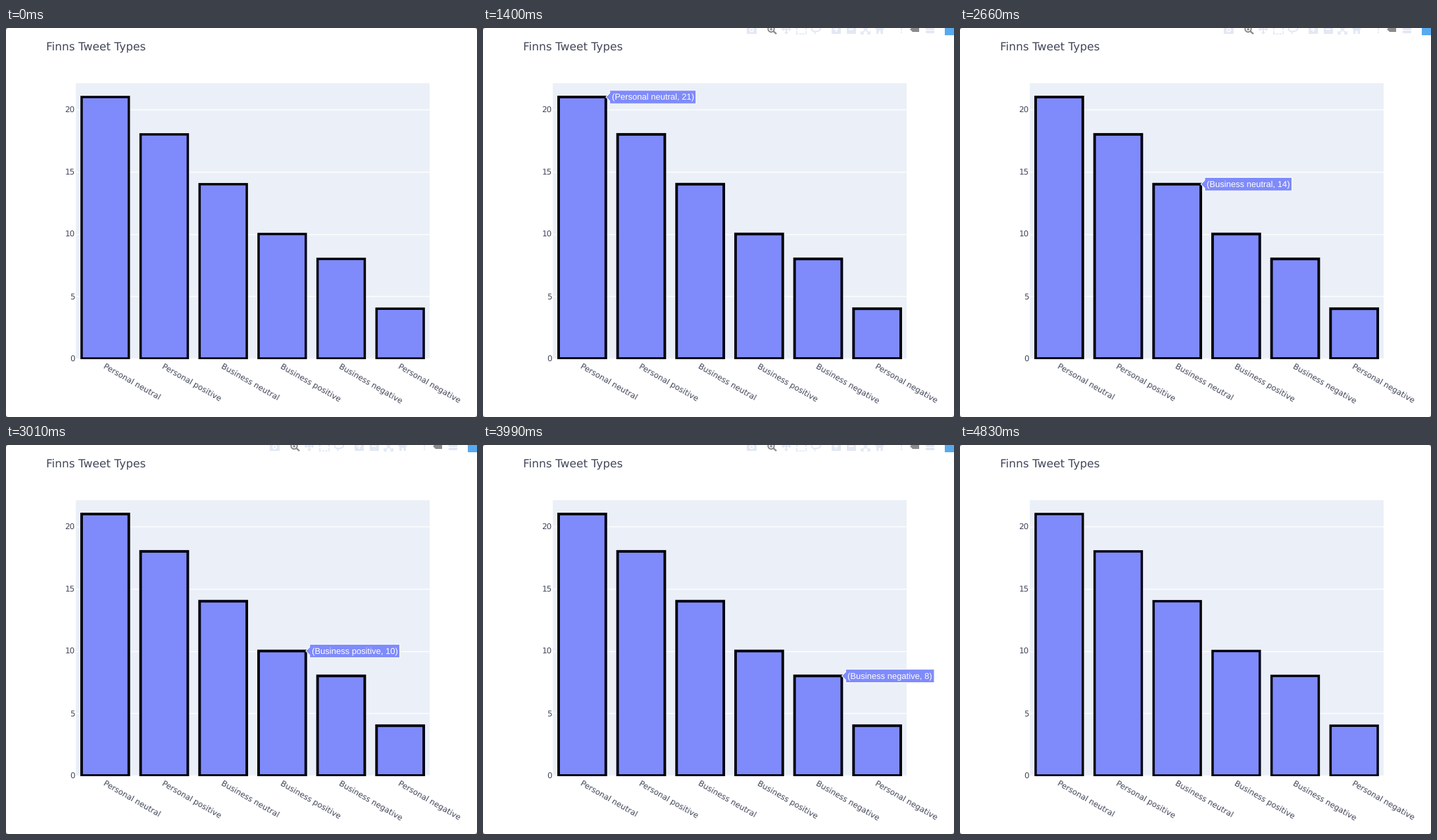
Recreate the animation shown at these times as a matplotlib script. Size 716 by 592 pixels, loop 4.9 s.

```python
import matplotlib.pyplot as plt
from matplotlib.animation import FuncAnimation
from matplotlib.patches import Circle, Polygon, Rectangle

W, H, DPI = 716, 592, 100
STEP, LOOP = 70, 4900
PT = 72 / DPI

INK = "#42475a"
PANEL = "#ebf0f8"
BAR = "#7f8bfb"
PALE = "#e3e8f3"
GREY = "#8b8b8b"
BLUE = "#58a9ee"

LEFT, RIGHT, TOP, BASE = 106, 644, 84, 503
UNIT = 18.95
SLOT = (RIGHT - LEFT) / 6
DATA = [
    ("Personal neutral", 21),
    ("Personal positive", 18),
    ("Business neutral", 14),
    ("Business positive", 10),
    ("Business negative", 8),
    ("Personal negative", 4),
]

# (start in ms, hovered bar)
HOVER = [(0, None), (1190, 0), (2100, 1), (2660, 2), (2940, 3), (3710, 4), (4270, None)]
TOOLS_ON, TOOLS_OFF, FADE = 910, 4270, 280

plt.rcParams["font.family"] = "DejaVu Sans"
plt.rcParams["text.hinting"] = "none"
plt.rcParams["toolbar"] = "None"

fig = plt.figure(figsize=(W / DPI, H / DPI), dpi=DPI, facecolor="white")
ax = fig.add_axes([0, 0, 1, 1])
ax.set_xlim(0, W)
ax.set_ylim(H, 0)
ax.axis("off")


def rect(x, y, w, h, color, **kw):
    return ax.add_patch(Rectangle((x, y), w, h, fc=color, lw=0, **kw))


def line(xs, ys, color, width, **kw):
    return ax.plot(xs, ys, color=color, lw=width * PT,
                   solid_capstyle="butt", **kw)[0]


def text(x, y, s, size, color=INK, **kw):
    return ax.text(x, y, s, fontsize=size * PT, color=color, **kw)


def draw_chart():
    rect(LEFT, TOP, RIGHT - LEFT, BASE - TOP, PANEL, zorder=0)
    text(61, 34, "Finns Tweet Types", 17, va="baseline")
    for v in range(0, 21, 5):
        y = BASE - v * UNIT
        line([LEFT, RIGHT], [y, y], "white", 1.4, zorder=1)
        text(104.7, y + 4.4, str(v), 12, ha="right", va="baseline")

    clip = Rectangle((LEFT, TOP), RIGHT - LEFT, BASE - TOP + 0.6,
                     transform=ax.transData)
    bars = []
    for i, (name, v) in enumerate(DATA):
        x = LEFT + SLOT * (i + 0.1)
        bar = Rectangle((x, BASE - v * UNIT), SLOT * 0.8, v * UNIT,
                        fc=BAR, ec="#00000c", lw=3.6 * PT,
                        joinstyle="miter", snap=False, zorder=2)
        ax.add_patch(bar)
        bar.set_clip_path(clip)
        bars.append(bar)
        text(147 + SLOT * i, 517, name, 12, rotation=-30,
             rotation_mode="anchor", ha="left", va="baseline")

    for cx, sx in ((0, 1), (W, -1)):
        for cy, sy in ((0, 1), (H, -1)):
            ax.add_patch(Polygon([(cx, cy), (cx + 2.5 * sx, cy), (cx, cy + 2.5 * sy)],
                                 fc="#8c8c8c", lw=0))
    return bars


def draw_tip(i):
    name, v = DATA[i]
    x, y = LEFT + SLOT * (i + 0.9), BASE - v * UNIT
    label = text(x + 9, y + 4.5, f"({name}, {v})", 13, "white",
                 family="Liberation Sans", va="baseline", zorder=6)
    width = label.get_window_extent(fig.canvas.get_renderer()).width
    a, b, h = x + 6, x + 12 + width, 10.2
    box = Polygon([(x, y), (a, y - 6), (a, y - h), (b, y - h),
                   (b, y + h), (a, y + h), (a, y + 6)],
                  fc=BAR, ec="white", lw=PT, zorder=5)
    ax.add_patch(box)
    return [label, box]


def draw_tools():
    parts = []

    def box(*a):
        parts.append(rect(*a, zorder=3))

    def stroke(xs, ys, color=PALE, width=2, **kw):
        parts.append(line(xs, ys, color, width, zorder=4, **kw))

    def ring(x, y, r, color, width):
        parts.append(ax.add_patch(Circle((x, y), r, fc="none", ec=color,
                                         lw=width * PT, zorder=4)))

    # camera
    box(401, 0, 15, 8.5, PALE)
    ring(408.5, 3, 2.6, "white", 1.6)
    # zoom
    ring(438, 1.5, 4.6, GREY, 2)
    stroke([441, 446], [4.5, 9], GREY, 2.4)
    stroke([436, 440], [1.5, 1.5], GREY, 1.5)
    stroke([438, 438], [-0.5, 3.5], GREY, 1.5)
    # pan
    stroke([454, 468], [2, 2])
    stroke([461, 461], [0, 9])
    for tri in ([(458, 6), (464, 6), (461, 10)],
                [(457, -1), (457, 5), (453.5, 2)],
                [(465, -1), (465, 5), (468.5, 2)]):
        parts.append(ax.add_patch(Polygon(tri, fc=PALE, lw=0, zorder=4)))
    # box select
    for x in (477, 491):
        stroke([x, x], [0, 9], linestyle=(0, (1.4, 1)))
    stroke([476, 492], [8.5, 8.5], linestyle=(0, (1.4, 1)))
    # lasso
    stroke([500, 499.5, 503, 509, 513, 513], [0, 3, 5.5, 5, 2.5, 0])
    stroke([503, 505, 504], [5, 7, 9.5], width=1.6)
    # zoom in and out
    for x in (529.5, 552.5):
        box(x, 0, 14, 9, PALE)
        stroke([x + 3.5, x + 10.5], [2, 2], "white", 1.8)
    stroke([536.5, 536.5], [0, 5.5], "white", 1.8)
    # autoscale
    stroke([576, 587], [-3, 8])
    stroke([587, 576], [-3, 8])
    stroke([575, 575, 579], [5, 8.7, 8.7], width=1.8)
    stroke([584, 588, 588], [8.7, 8.7, 5], width=1.8)
    # home
    parts.append(ax.add_patch(Polygon(
        [(595.5, 2), (603, -5), (610.5, 2), (608, 2), (608, 9), (604.5, 9),
         (604.5, 4.5), (601.5, 4.5), (601.5, 9), (598, 9), (598, 2)],
        fc=PALE, lw=0, zorder=4)))
    # spike line
    stroke([635.5, 635.5], [0, 3.5], width=1.6)
    stroke([635.5, 635.5], [5, 8], width=1.6)
    # hover modes
    parts.append(ax.add_patch(Polygon(
        [(649, 2), (653, -2), (663, -2), (663, 6), (653, 6)],
        fc=GREY, lw=0, zorder=4)))
    for y in (1, 6):
        parts.append(ax.add_patch(Polygon(
            [(672, y), (674.5, y - 2), (686, y - 2), (686, y + 2), (674.5, y + 2)],
            fc=PALE, lw=0, zorder=4)))
    box(702, 0, 14, 10.5, BLUE)
    return parts


bars = draw_chart()
tips = [draw_tip(i) for i in range(5)]
tools = draw_tools()


def update(n):
    t = n * STEP
    hovered = [bar for start, bar in HOVER if start <= t][-1]
    for i, tip in enumerate(tips):
        for part in tip:
            part.set_visible(i == hovered)

    shown = TOOLS_ON <= t < TOOLS_OFF
    alpha = min(1, (t - TOOLS_ON + STEP) / FADE) if shown else 0
    for part in tools:
        part.set_visible(shown)
        part.set_alpha(alpha)
    for bar in bars:
        bar.set_linewidth((4 if shown else 3.6) * PT)
    return []


anim = FuncAnimation(fig, update, frames=LOOP // STEP, interval=STEP,
                     init_func=lambda: update(0), repeat=True, repeat_delay=0)
plt.show()
```
